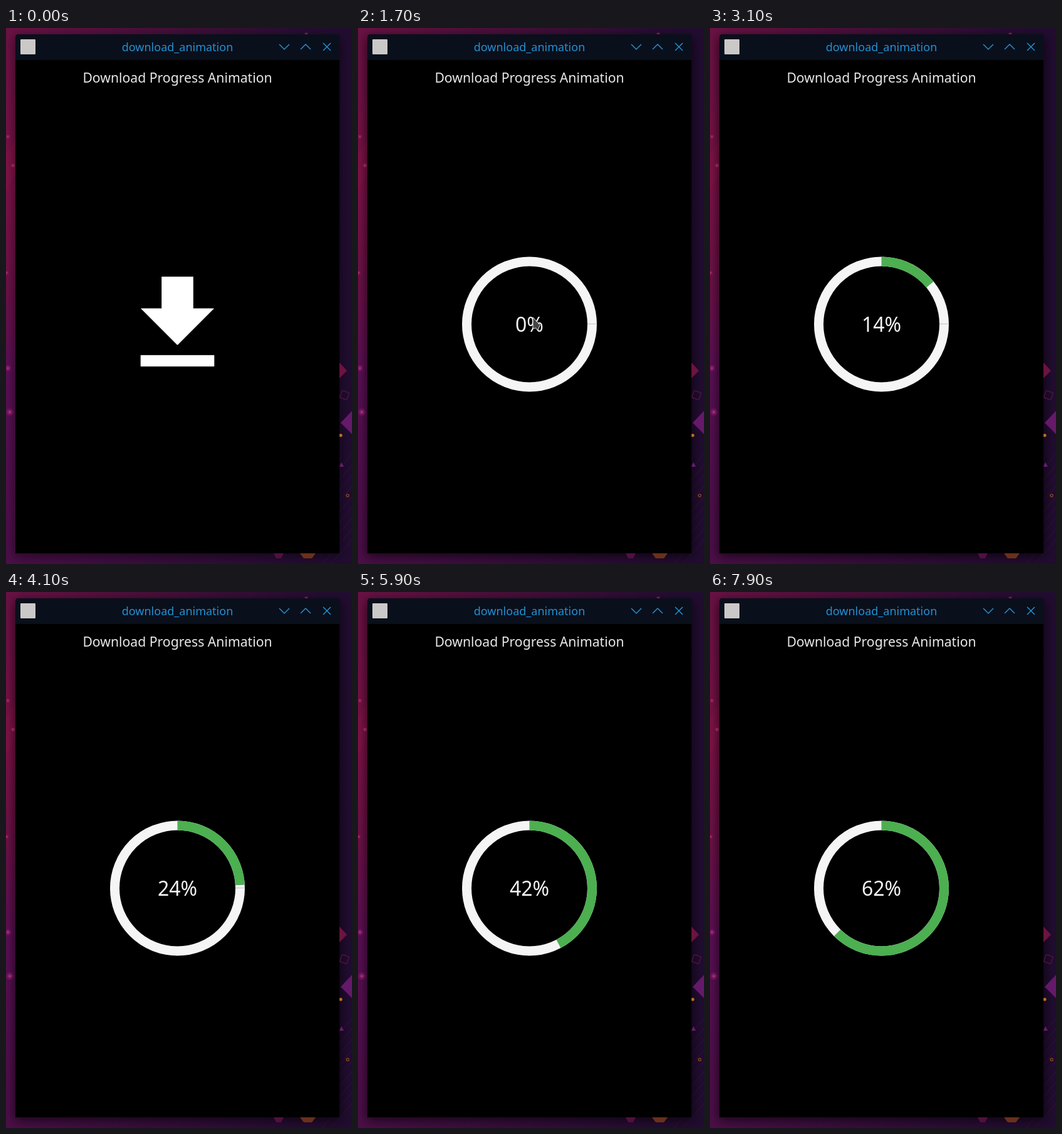
An HTML page for the animation above (8 s loop, 552x854 px).

```html
<!DOCTYPE html>
<html lang="en">
<head>
<meta charset="utf-8">
<title>Download progress</title>
<style>
  html, body { margin: 0; width: 100%; height: 100%; overflow: hidden; background: #000; }
  svg { display: block; width: 552px; height: 854px; }
  text { font-family: "Noto Sans", "Open Sans", sans-serif; text-anchor: middle; }
</style>
</head>
<body>
<svg viewBox="0 0 552 854">
  <defs>
    <linearGradient id="left" x2="0" y2="1">
      <stop offset="0" stop-color="#6a1244"/>
      <stop offset=".3" stop-color="#7c1248"/>
      <stop offset=".48" stop-color="#6c1148"/>
      <stop offset=".65" stop-color="#5a1054"/>
      <stop offset="1" stop-color="#4c0f48"/>
    </linearGradient>
    <linearGradient id="right">
      <stop offset="0" stop-color="#210d30" stop-opacity="0"/>
      <stop offset=".85" stop-color="#210d30" stop-opacity=".9"/>
      <stop offset="1" stop-color="#210d30"/>
    </linearGradient>
    <radialGradient id="glow">
      <stop offset="0" stop-color="#e0509a"/>
      <stop offset=".25" stop-color="#b02c7c" stop-opacity=".6"/>
      <stop offset="1" stop-color="#a02070" stop-opacity="0"/>
    </radialGradient>
    <filter id="blur" x="-10%" y="-10%" width="120%" height="120%"><feGaussianBlur stdDeviation="9"/></filter>
  </defs>

  <!-- wallpaper -->
  <rect width="552" height="854" fill="url(#left)"/>
  <rect width="552" height="854" fill="url(#right)"/>
  <path d="M0 200 15 178V232L0 260Z" fill="#8c1648" opacity=".35"/>
  <g id="lines" stroke="#4a1848" opacity=".5"></g>
  <rect id="shadow" x="13" y="14" width="521" height="828" filter="url(#blur)"/>
  <g fill="url(#glow)">
    <circle cx="6" cy="612" r="7"/>
    <circle cx="3" cy="542" r="6"/>
    <circle cx="3" cy="173" r="4"/>
    <circle cx="11" cy="219" r="4"/>
    <circle cx="1" cy="390" r="4"/>
    <circle cx="479" cy="10" r="4"/>
  </g>
  <path d="M531 532 544 546 531 559Z" fill="#6b1440"/>
  <path d="M534 629 552 610V647Z" fill="#66196a"/>
  <rect x="534" y="579" width="12" height="12" rx="2" transform="rotate(20 540 585)" fill="none" stroke="#4a1440" stroke-width="1.5"/>
  <circle cx="534" cy="649" r="2.6" fill="#b5701f"/>
  <path d="M532 699 535 692 539 699Z" fill="#6b1c70"/>
  <circle cx="545" cy="745" r="2" fill="none" stroke="#80441f" stroke-width="1.5"/>
  <path d="M469 837H494L488 845H475Z" fill="#6b301c"/>
  <path d="M427 837H443L439 845H431Z" fill="#4f1040"/>

  <!-- window -->
  <path d="M15 837V15Q15 10 20 10H527Q532 10 532 15V837Z"/>
  <path d="M15 51V15Q15 10 20 10H527Q532 10 532 15V51Z" fill="#0a0f1c"/>
  <rect x="23" y="18" width="24" height="24" rx="1" fill="#cbc9c7"/>
  <text x="273.5" y="37" font-size="18" fill="#2390cf">download_animation</text>
  <path d="M436 26 444 34 452 26M470 34 478 26 486 34M506 24 518 36M518 24 506 36" fill="none" stroke="#2390cf" stroke-width="1.5"/>
  <text x="273.5" y="87" font-size="21.2" fill="#e8e8e8">Download Progress Animation</text>

  <path id="icon" d="M248.5 396.5H298.5V447H331.5L273.5 505 215.5 447H248.5ZM215 521.5H332V539H215Z" fill="#fff" stroke="#fff" stroke-width=".6" stroke-linejoin="round"/>

  <g id="ring" fill="none" stroke-width="15">
    <circle cx="273.5" cy="472" r="100" stroke="#f5f5f5"/>
    <path d="M366 471.5H381" stroke="#c4c4c4" stroke-width="1"/>
    <circle id="arc" cx="273.5" cy="472" r="100" stroke="#4caf50" pathLength="100" transform="rotate(-90 273.5 472)"/>
    <text id="label" x="273.5" y="484" font-size="32" fill="#f2f2f2"></text>
  </g>

  <path id="cursor" d="M0 0 11.5 12.5 7.5 20.5 4.5 17 0 18Z" fill="#444" stroke="#eee" stroke-linejoin="round"/>
</svg>
<script>
const $ = id => document.getElementById(id);
const LOOP = 8000, STEP = 100, CLICK = 1700, MS_PER_PERCENT = 99.3;

// pointer path: time, x, y
const path = [
  [500, 552, 500], [1100, 286, 464], [1200, 279, 461],
  [1900, 279, 461], [2200, 318, 452], [2700, 552, 425]
];

$('lines').innerHTML = Array.from({ length: 9 }, (_, i) =>
  `<path d="M500 ${740 + i * 17}L560 ${670 + i * 17}"/>`).join('');

const show = (id, on) => $(id).setAttribute('visibility', on ? 'visible' : 'hidden');

function pointerAt(t) {
  const i = path.findIndex(p => p[0] > t);
  if (i < 1) return null;
  const [a, b] = [path[i - 1], path[i]];
  const k = (t - a[0]) / (b[0] - a[0]);
  return [a[1] + (b[1] - a[1]) * k, a[2] + (b[2] - a[2]) * k];
}

function draw(now) {
  const t = Math.floor(now % LOOP / STEP) * STEP;
  const started = t >= CLICK;
  const percent = Math.max(0, (t - CLICK) / MS_PER_PERCENT);

  show('icon', !started);
  show('ring', started);
  $('arc').setAttribute('stroke-dasharray', `${percent} 100`);
  $('label').textContent = Math.floor(percent) + '%';
  $('shadow').setAttribute('opacity', started ? .65 : .5);

  const pos = pointerAt(t);
  show('cursor', pos);
  if (pos) $('cursor').setAttribute('transform', `translate(${pos})`);
  requestAnimationFrame(draw);
}
requestAnimationFrame(draw);
</script>
</body>
</html>
```
